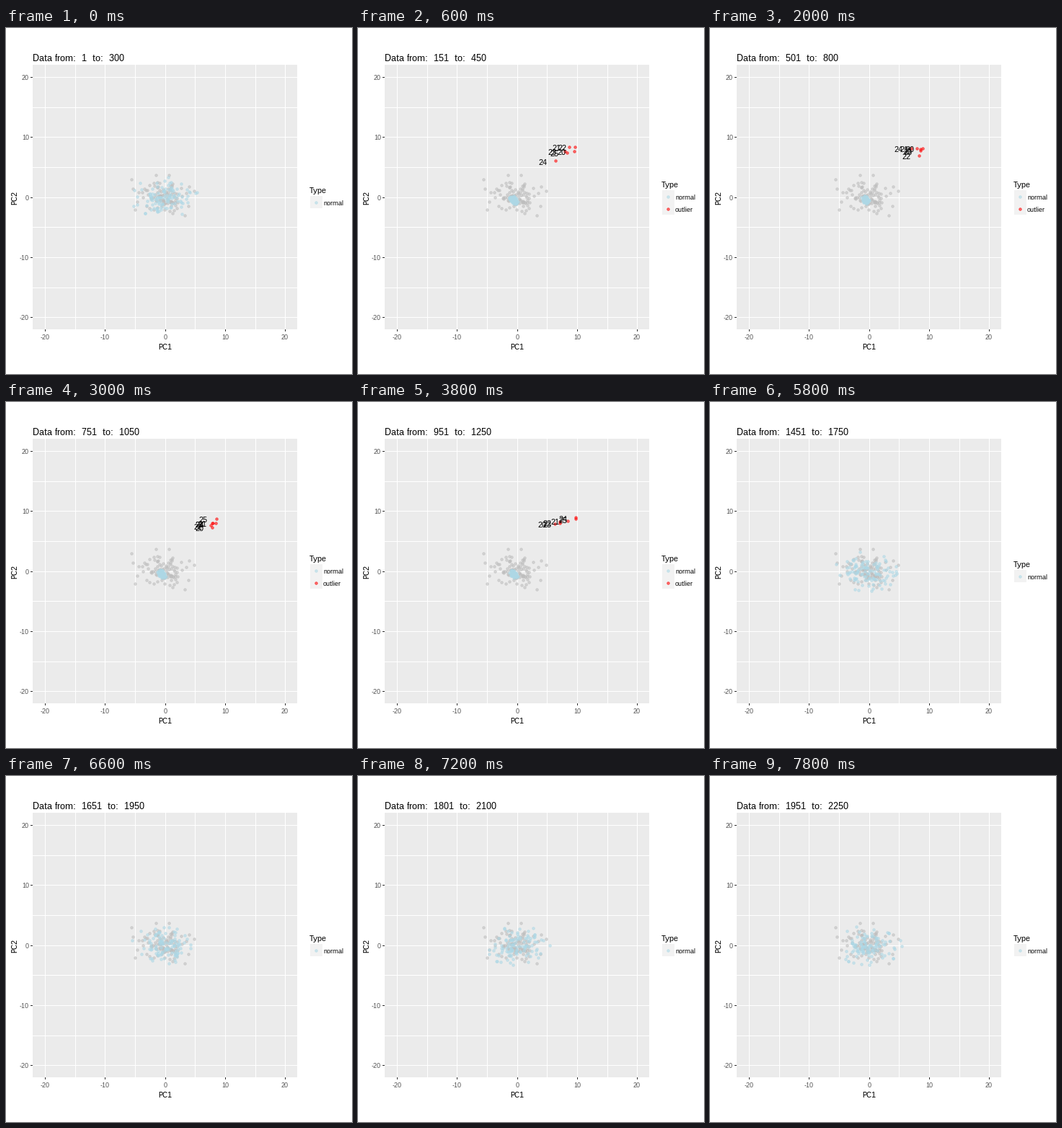
Write a matplotlib script that moves like this. It is 480 by 480 pixels and loops after 8 s.

```python
import numpy as np
import matplotlib.pyplot as plt
from matplotlib.animation import FuncAnimation
from matplotlib.colors import to_rgba
from matplotlib.patches import Rectangle

plt.rcParams["font.family"] = "Liberation Sans"
plt.rcParams["text.hinting"] = "native"
plt.rcParams["text.hinting_factor"] = 1

SIZE, DPI = 480, 100
PT = 72 / DPI              # points per pixel
FRAMES, STEP, WINDOW = 40, 50, 300
ALARM = range(3, 20)       # windows that hold outliers
LEFT, TOP, SIDE = 37, 51, 367
UNIT = SIDE / 44           # pixels per axis unit

rng = np.random.default_rng(12)

fig = plt.figure(figsize=(SIZE / DPI, SIZE / DPI), dpi=DPI, facecolor="white")
ax = fig.add_axes([0, 0, 1, 1])
ax.set_xlim(0, SIZE)
ax.set_ylim(SIZE, 0)
ax.axis("off")


def box(x, y, w, h, color):
    return ax.add_patch(Rectangle((x, y), w, h, fc=color, lw=0, antialiased=False))


def label(x, y, s, size, color="black", **kw):
    kw.setdefault("va", "baseline")
    return ax.text(x, y, s, fontsize=size * PT, color=color, **kw)


def dots(color, z):
    return ax.plot([], [], "o", ms=3.3 * PT, mew=PT, mfc=to_rgba(color, 0.45),
                   mec=to_rgba(color, 0.7), zorder=z)[0]


def place(artist, pts):
    artist.set_data(pts[:, 0], pts[:, 1])


def draw_panel():
    box(LEFT, TOP, SIDE, SIDE, "#EBEBEB")
    for v in range(-20, 21, 5):
        px = round(LEFT + (v + 22) * UNIT + 0.15)
        py = round(TOP + (22 - v) * UNIT + 0.15)
        box(px, TOP, 1, SIDE, "white")
        box(LEFT, py, SIDE, 1, "white")
        if v % 10 == 0:
            box(px, TOP + SIDE, 1, 3, "#333333")
            box(LEFT - 3, py, 3, 1, "#333333")
            label(px, 432, str(v), 9, "#4D4D4D", ha="center")
            label(32, py + 4, str(v), 9, "#4D4D4D", ha="right")
    label(220.5, 446, "PC1", 11, ha="center")
    label(17, 235.5, "PC2", 11, ha="right", va="center", rotation=90)


def trim(z, limit):
    """Pull points beyond the limit back onto its circle."""
    r = np.linalg.norm(z, axis=-1, keepdims=True)
    return z * np.minimum(1, limit / r)


# Fixed reference cloud: a few far points around a random core.
FAR = [(174, 210), (176, 223), (208, 204), (226, 204), (261, 226), (254, 220),
       (253, 247), (248, 260), (231, 257), (179, 252), (182, 241), (184, 228)]
core = (219, 234) + trim(rng.normal(size=(95, 2)), 2.1) * (15, 10)
reference = np.vstack([FAR, core])

# Outliers 20 to 25 at three windows.
OUTLIERS = {
    3: [(300, 171), (293, 165), (301, 165), (287, 171), (274, 184), (290, 173)],
    10: [(295, 167), (287, 167), (290, 177), (292, 170), (279, 167), (292, 168)],
    19: [(273, 169), (291, 165), (280, 166), (280, 168), (302, 160), (302, 162)],
}

COUNT, CHUNKS = 108, 6
home = rng.normal(size=(COUNT, 2))
drift = rng.normal(size=(FRAMES + CHUNKS, COUNT, 2))
wobble = rng.normal(size=(FRAMES, 6, 2)).clip(-1.6, 1.6)


def normal_points(i):
    """Averages over the overlapping chunks of the sliding window."""
    z = 0.5 * home + 0.87 * drift[i:i + CHUNKS].sum(axis=0) / CHUNKS ** 0.5
    z = trim(z, 2.6)
    if i in ALARM:
        x, y = z.T
        return np.column_stack([216 + 2.3 * x, 238.5 + 1.1 * x + 2 * y])
    return (219, 234.5) + z * (18, 10.5)


def outlier_points(i):
    """Blend between key windows, with jitter that vanishes at each."""
    a = max(k for k in OUTLIERS if k <= i)
    b = min(k for k in OUTLIERS if k >= i)
    t = (i - a) / max(b - a, 1)
    p, q = np.array(OUTLIERS[a]), np.array(OUTLIERS[b])
    return p + (q - p) * t + 5 * np.sin(np.pi * t) * wobble[i]


draw_panel()
title = label(37, 46, "", 13)
grey, blue, red = dots("#BEBEBE", 3), dots("#ADD8E6", 4), dots("red", 5)
place(grey, reference)
tags = [label(0, 0, str(n), 11, zorder=6) for n in range(20, 26)]

heading = label(421, 229, "Type", 11)
rows = [(box(422, 0, 17, 17, "#F2F2F2"), dots(color, 4), label(440, 0, name, 9))
        for name, color in (("normal", "#ADD8E6"), ("outlier", "red"))]


def draw_legend(alarm):
    top = 225 if alarm else 233
    heading.set_y(top - 4)
    for k, (key, dot, text) in enumerate(rows):
        y = top + 17 * k
        key.set_y(y)
        dot.set_data([430], [y + 8.5])
        text.set_y(y + 13)
        for part in (key, dot, text):
            part.set_visible(alarm or k == 0)


def update(i):
    first = 1 + STEP * i
    title.set_text(f"Data from:  {first}  to:  {first + WINDOW - 1}")
    alarm = i in ALARM
    place(blue, normal_points(i))
    pts = outlier_points(i) if alarm else np.empty((0, 2))
    place(red, pts)
    for tag in tags:
        tag.set_visible(alarm)
    for tag, (x, y) in zip(tags, pts):
        tag.set_position((x - 24, y + 5.5))
    draw_legend(alarm)
    return []


anim = FuncAnimation(fig, update, frames=FRAMES, interval=200,
                     init_func=lambda: [], repeat=True, repeat_delay=0)
plt.show()
```
